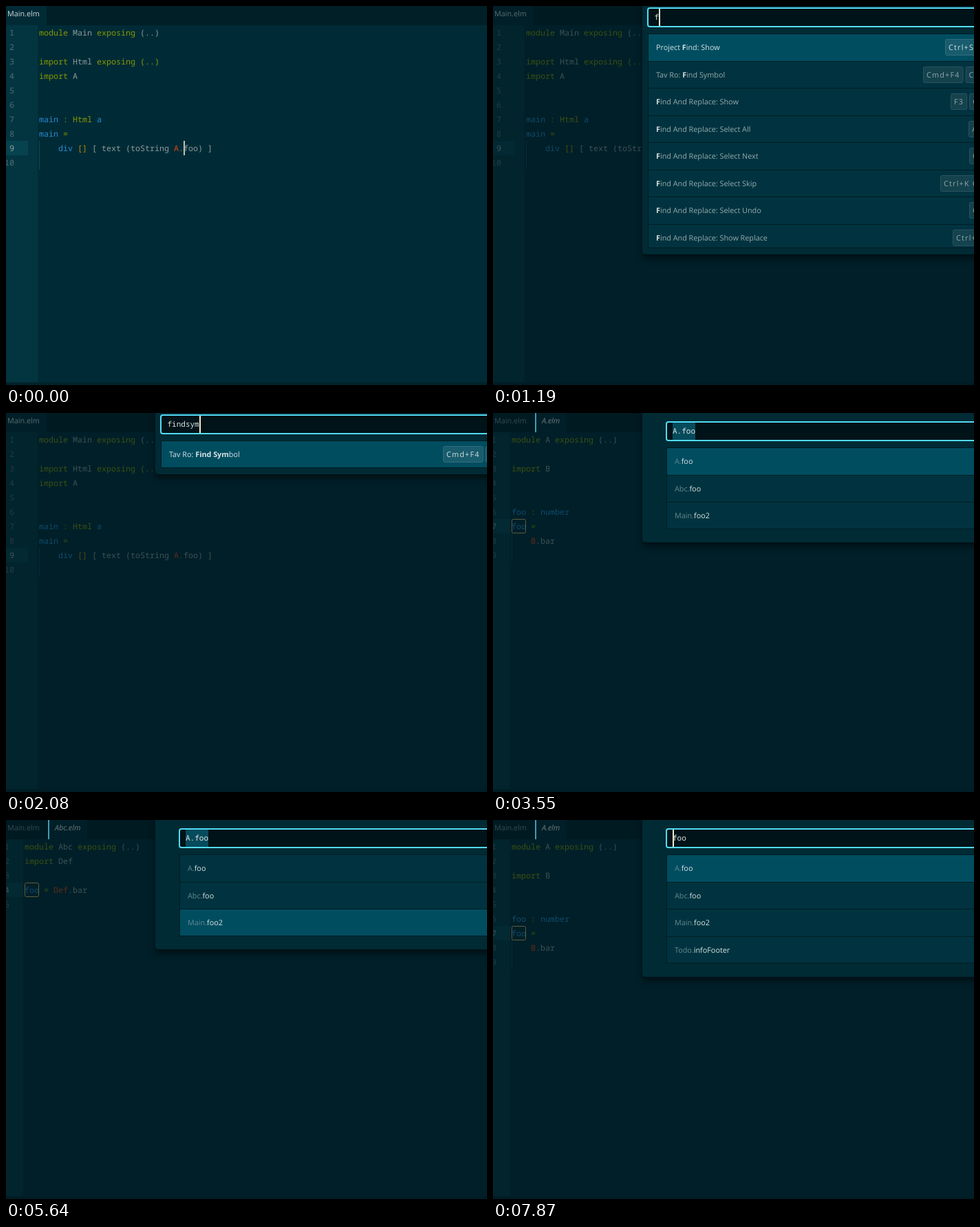
An HTML page with a canvas for the animation above (8 s loop, 699x551 px).

```html
<!DOCTYPE html>
<html lang="en">
<head>
<meta charset="utf-8">
<title>Editor symbol search</title>
<style>
html, body { margin: 0; width: 100%; height: 100%; overflow: hidden; background: #002b36; }
canvas { display: block; }
</style>
</head>
<body>
<canvas id="stage" width="699" height="551"></canvas>
<script>
const W = 699, H = 551, LOOP = 8000;
const ctx = document.getElementById('stage').getContext('2d');

const UI = '10.8px "Open Sans", sans-serif';
const CODE = '11.667px "Noto Sans Mono", monospace';
const INPUT = '11px "Noto Sans Mono", monospace';
const CHAR = 7, LINE = 21, TOP = 28, ROW = 39.5, INPUT_CHAR = 6.6;

// Code colours, chosen by the letter after "~".
const INK = { g: '#859900', t: '#8b9b9d', b: '#268bd2', y: '#b58900', r: '#dc4416' };

const DOCS = {
  main: {
    gutter: 46, active: 9, guide: [9, 10],
    lines: ['~gmodule ~tMain ~gexposing ~t(..)', '', '~gimport ~tHtml ~gexposing (..)',
      '~gimport ~tA', '', '', '~bmain ~g: Html ~ba', '~bmain ~g=',
      '~t    ~bdiv ~y[] ~t[ text (toString ~rA~g.~tfoo) ]', '']
  },
  a: {
    gutter: 25, active: 7, guide: [8, 9], tab: 'A.elm', mark: 3,
    lines: ['~gmodule ~tA ~gexposing ~t(..)', '', '~gimport ~tB', '', '',
      '~bfoo ~g: ~bnumber', '~bfoo ~g=', '~t    ~rB~t.bar', '']
  },
  abc: {
    gutter: 25, active: 4, tab: 'Abc.elm', mark: 3,
    lines: ['~gmodule ~tAbc ~gexposing ~t(..)', '~gimport ~tDef', '',
      '~bfoo ~g= ~rDef~t.bar', '']
  },
  other: {
    gutter: 25, active: 4, tab: 'Main.elm', mark: 4,
    lines: ['~gmodule ~tMain ~gexposing ~t(..)', '~gimport ~tA', '',
      '~bfoo2 ~g= ~rA~t.foo', '']
  }
};

// Each row: label with *bold* parts, x of the first key, keys.
const COMMANDS = [
  ['Graceful Pane Glider: Page Down', 617, 'Ctrl+U', 'PageDown'],
  ['Graceful Pane Glider: Page Up', 597, 'Ctrl+Shift+U', 'PageUp'],
  ['Application: About'],
  ['Application: Add Project Folder', 666, 'Ctrl+Shift+O'],
  ['Application: Bring All Windows To Front'],
  ['Application: Hide'],
  ['Application: Hide Other Applications'],
  ['Application: Install Update']
];
const FOUND = [
  ['Project Find: Show', 657, 'Ctrl+Shift+F'],
  ['Tav Ro: Find Symbol', 625, 'Cmd+F4', 'Ctrl+F4'],
  ['Find And Replace: Show', 665, 'F3', 'Ctrl+F'],
  ['Find And Replace: Select All', 691, 'Alt+F3'],
  ['Find And Replace: Select Next', 692, 'Ctrl+D'],
  ['Find And Replace: Select Skip', 650, 'Ctrl+K Ctrl+D'],
  ['Find And Replace: Select Undo', 692, 'Ctrl+U'],
  ['Find And Replace: Show Replace', 668, 'Ctrl+Alt+F']
];
const SYMBOLS = ['A.foo', 'Abc.foo', 'Main.foo2', 'Todo.infoFooter'];

const PALETTE = { x: 224, y: 2, textX: 234.5, rowText: 237, pad: 9, limit: 352 };
const FINDER = { x: 251, y: 12, textX: 261, rowText: 264, pad: 19, limit: H };

const START = { doc: 'main', fade: 0, caret: false, query: '', selected: false,
  rows: 0, pick: 0, grow: 0, edge: false };
const STEPS = [
  ...[1, 2, 3, 4, 5].map(k => [k * 150, { panel: PALETTE, fade: k / 5 }]),
  [1050, { caret: true }],
  ...[...'findsym'].map((c, i) => [1180 + i * 150 - (i ? 0 : 0), { query: 'findsym'.slice(0, i + 1) }]),
  [2380, { panel: FINDER, query: '', caret: true }],
  [2530, { query: 'A.foo', selected: true, caret: false }],
  [2680, { rows: 3 }],
  [2830, { doc: 'a', grow: 0.2 }],
  [2980, { grow: 0.45 }],
  [3120, { grow: 0.7 }],
  [3260, { grow: 0.9 }],
  [3410, { grow: 1 }],
  [3550, { edge: true }],
  [4600, { pick: 1 }],
  [4750, { doc: 'abc', grow: 0.6 }],
  [4890, { grow: 1 }],
  [5640, { pick: 2 }],
  [5780, { doc: 'other', grow: 0.6 }],
  [5930, { grow: 1 }],
  [7130, { query: 'foo', selected: false, caret: true }],
  [7570, { rows: 4, pick: 0 }],
  [7720, { doc: 'a', grow: 0.6 }],
  [7870, { grow: 1 }]
];

function stateAt(time) {
  const state = { ...START };
  for (const [at, change] of STEPS) if (time >= at) Object.assign(state, change);
  return state;
}

function box(x, y, w, h, color) {
  ctx.fillStyle = color;
  ctx.fillRect(x, y, w, h);
}

function round(x, y, w, h, r, fill, stroke, weight = 1) {
  ctx.beginPath();
  ctx.roundRect(x, y, w, h, r);
  if (fill) { ctx.fillStyle = fill; ctx.fill(); }
  if (stroke) { ctx.strokeStyle = stroke; ctx.lineWidth = weight; ctx.stroke(); }
}

// Draws text and returns the x where it ends.
function label(str, x, y, font, color, align = 'left') {
  ctx.font = font;
  ctx.fillStyle = color;
  ctx.textAlign = align;
  ctx.fillText(str, x, y);
  return x + ctx.measureText(str).width;
}

function drawTabs(doc, s) {
  box(0, 0, W, TOP, '#001f27');
  if (!doc.tab) {
    box(0, 0, 59, TOP, '#002b36');
    label('Main.elm', 2, 15, UI, '#d3dcde');
    return;
  }
  label('Main.elm', 2, 15, UI, '#768d94');
  const font = 'italic ' + UI;
  ctx.font = font;
  const width = (ctx.measureText(doc.tab).width + 20) * s.grow;
  ctx.save();
  ctx.beginPath();
  ctx.rect(61, 0, width, TOP);
  ctx.clip();
  box(61, 0, width, TOP, '#002b36');
  label(doc.tab, 71, 15, font, '#f4fafa');
  ctx.restore();
}

function drawLine(line, x, y) {
  for (const part of line.split('~').slice(1)) {
    const str = part.slice(1);
    label(str, x, y, CODE, INK[part[0]]);
    x += str.length * CHAR;
  }
}

function drawEditor(s) {
  const doc = DOCS[s.doc], left = doc.gutter + 2;
  const top = n => TOP + (n - 1) * LINE;
  box(0, 0, W, H, '#002b36');
  box(0, TOP, doc.gutter, H - TOP, '#033540');
  box(0, top(doc.active), Math.min(doc.gutter, 32), LINE, '#07424f');
  box(0, 547, W, 4, '#00232c');
  drawTabs(doc, s);
  if (doc.guide) {
    const [from, to] = doc.guide;
    box(left, top(from), 1, (to - from + 1) * LINE, '#0b4b59');
  }
  doc.lines.forEach((line, i) => {
    const y = top(i + 1) + 15;
    const color = i + 1 === doc.active ? '#93a1a1' : '#4e6d75';
    label(String(i + 1), left - 36 + (doc.tab ? 14 : 0), y, CODE, color, 'right');
    drawLine(line, left, y);
  });
  if (doc.mark) {
    round(left + 0.5, top(doc.active) + 0.5, doc.mark * CHAR - 1, LINE - 1, 2, null, '#d5bd68');
  }
  if (!s.panel) box(258, 196, 2, LINE, '#b9c3c1');
}

function drawKeys(x, mid, keys, picked) {
  for (const key of keys) {
    ctx.font = UI;
    ctx.letterSpacing = '1.2px';
    const w = ctx.measureText(key).width + 10;
    round(x + 0.5, mid - 11.5, w - 1, 23, 2, picked ? '#195c6d' : '#14424d',
      picked ? '#2f6c7b' : '#2a545e');
    label(key, x + 5, mid + 4, UI, picked ? '#d4e1e3' : '#93a8ad');
    ctx.letterSpacing = '0px';
    x += w + 3;
  }
}

// Marks the typed letters of a command as bold.
function emphasize(name, query) {
  if (!query) return name;
  const head = query.slice(0, 4), tail = query.slice(4);
  let out = name.replace(new RegExp(head, 'i'), '*$&*');
  if (tail) out = out.replace(new RegExp('(\\*[ :A-Za-z]*?)(' + tail + ')(?!.*\\*)', 'i'), '$1*$2*');
  return out.replace('* *', ' ');
}

function drawCommand([name, keyX, ...keys], query, x, mid, picked) {
  emphasize(name, query).split('*').forEach((part, i) => {
    const bold = i % 2;
    const color = bold ? '#d9e2e2' : picked ? '#d5e3e6' : '#96abb0';
    x = label(part, x, mid + 4, (bold ? 'bold ' : '') + UI, color);
  });
  drawKeys(keyX, mid, keys, picked);
}

function drawSymbol(name, x, mid) {
  const cut = name.indexOf('.') + 1;
  x = label(name.slice(0, cut), x, mid + 4, UI, '#658890');
  label(name.slice(cut), x, mid + 4, UI, '#dae5e6');
}

function commandRows(query) {
  if (!query) return COMMANDS;
  if (query.length < 6) return FOUND;
  const [name, x, ...keys] = FOUND[1];
  return [[name, x + 10, ...keys]];
}

function drawInput(p, s) {
  round(p.x + 1, p.y + 1, W, 27, 3, '#001318', '#52dcf6', 2);
  const mid = p.y + 14;
  const width = s.query.length * INPUT_CHAR;
  if (s.selected) box(p.textX, p.y + 2, width, 25, '#064b5c');
  label(s.query, p.textX, mid + 4, INPUT, '#dce5e4');
  if (s.caret) {
    const x = p === FINDER ? p.textX : p.textX + width;
    box(Math.round(x), p.y + 2, 2, 25, '#f3ead0');
  }
}

function drawPanel(s) {
  const p = s.panel, finder = p === FINDER;
  const rows = finder ? SYMBOLS.slice(0, s.rows) : commandRows(s.query);
  const top = p.y + 38;
  const bottom = Math.min(p.limit, top + rows.length * ROW + 0.5);
  ctx.save();
  ctx.shadowColor = 'rgba(0,0,0,.5)';
  ctx.shadowBlur = 4 + 6 * s.fade;
  ctx.shadowOffsetY = 6;
  round(217, -20, W, Math.round(bottom + p.pad) + 20, 5, '#002b35');
  ctx.restore();
  drawInput(p, s);
  if (!rows.length) return;

  ctx.save();
  ctx.beginPath();
  ctx.rect(p.x + 1, top, W, bottom - top);
  ctx.clip();
  box(p.x + 1, top, W, bottom - top, '#001c23');
  rows.forEach((row, i) => {
    const y = Math.round(top + 1 + i * ROW), next = Math.round(top + 1 + (i + 1) * ROW);
    const picked = i === s.pick;
    box(p.x + 2, y, W, next - y - 1, picked ? '#004d60' : '#00333f');
    const mid = Math.round(top + 20 + i * ROW);
    if (finder) drawSymbol(row, p.rowText, mid);
    else drawCommand(row, s.query, p.rowText, mid, picked);
  });
  box(p.x + 1, bottom - 1, W, 1, '#001c23');
  ctx.restore();
}

function draw(time) {
  const s = stateAt(time);
  ctx.textBaseline = 'alphabetic';
  ctx.textRendering = 'geometricPrecision';
  drawEditor(s);
  if (s.panel) {
    box(0, 0, W, H, `rgba(0,23,30,${0.57 * s.fade})`);
    if (s.edge) box(61, 0, 2, TOP, '#439bb2');
    drawPanel(s);
  }
}

function tick() {
  draw(performance.now() % LOOP);
  requestAnimationFrame(tick);
}
tick();
</script>
</body>
</html>
```
